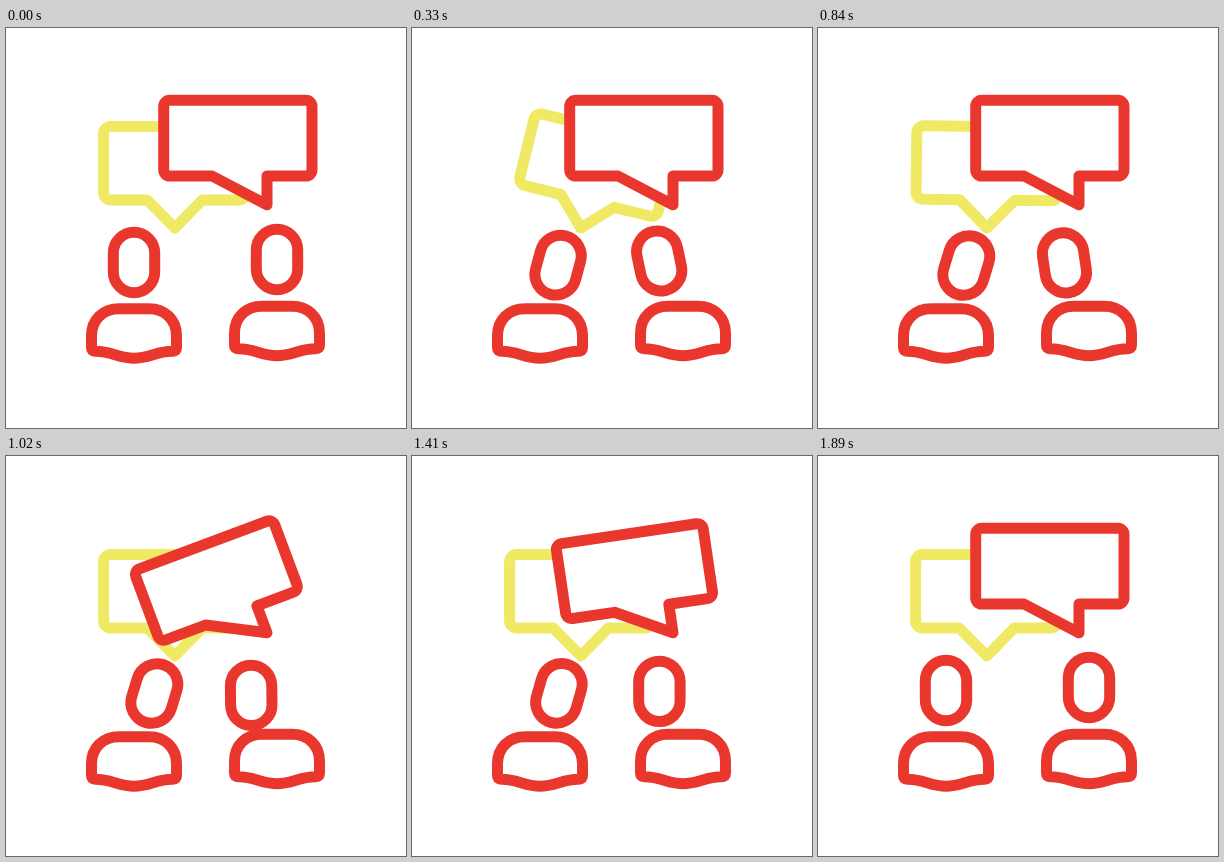
An HTML page with a canvas that plays this animation: 400x400 px, repeating every 1920 ms.

```html
<!DOCTYPE html>
<html lang="en">
<head>
<meta charset="utf-8">
<title>Conversation</title>
<style>
html, body { margin: 0; width: 100%; height: 100%; overflow: hidden; background: #fff; }
canvas { display: block; width: 100vmin; height: 100vmin; }
</style>
</head>
<body>
<canvas id="stage" width="400" height="400"></canvas>
<script>
const LOOP = 1920, STEP = 30;
const RED = '#ea372e', YELLOW = '#efe964';
const ctx = document.getElementById('stage').getContext('2d');
ctx.lineWidth = 11;
ctx.lineJoin = ctx.lineCap = 'round';

// Cosine ease from 0 to 1 between times a and b
function ease(t, a, b) {
  const u = Math.min(1, Math.max(0, (t - a) / (b - a)));
  return (1 - Math.cos(Math.PI * u)) / 2;
}

// Rises from a to b, holds, falls from c to d
const pulse = (t, a, b, c, d) => ease(t, a, b) - ease(t, c, d);

// Swing of a bubble on its tip, in degrees: each turn is smaller than the last
function swing(t) {
  const beat = 177, n = Math.floor(t / beat);
  const peak = i => i < 1 ? 0 : (-1) ** i * Math.max(0, 20.5 - 5.2 * (i - 1));
  return peak(n) + (peak(n + 1) - peak(n)) * ease(t, n * beat, (n + 1) * beat);
}

const BODY = new Path2D('M-42.5 308C-42.5 292 -31 281 -15 281H15C31 281 42.5 292 42.5 308' +
  'V320Q42.5 323.5 39 323.5C24 323 15 330.5 0 330.5C-15 330.5 -24 323 -39 323.5Q-42.5 323.5 -42.5 320Z');
const HEAD = new Path2D();
HEAD.roundRect(-20.7, -30.2, 41.4, 60.4, 20.7);

// Rounded speech bubble relative to its tip; tail joins the box at tailL and tailR
function bubble(l, t, r, b, tailL, tailR, rad) {
  const p = new Path2D();
  p.moveTo(0, 0);
  p.lineTo(tailL, b);
  p.arcTo(l, b, l, t, rad);
  p.arcTo(l, t, r, t, rad);
  p.arcTo(r, t, r, b, rad);
  p.arcTo(r, b, tailR, b, rad);
  p.lineTo(tailR, b);
  p.closePath();
  return p;
}
const BACK = bubble(-71.2, -101.5, 71.2, -28, -27.5, 27.5, 7);
const FRONT = bubble(-103.3, -104.5, 45, -28.8, -55, 0, 6);

function draw(path, color, x, y, turn = 0, fill = false) {
  ctx.save();
  ctx.translate(x, y);
  ctx.rotate(turn * Math.PI / 180);
  if (fill) {
    ctx.fillStyle = '#fff';
    ctx.fill(path);
  }
  ctx.strokeStyle = color;
  ctx.stroke(path);
  ctx.restore();
}

function render(t) {
  ctx.clearRect(0, 0, 400, 400);
  draw(BACK, YELLOW, 168.8, 200, swing(t));
  draw(FRONT, RED, 261, 176.8, swing(t - 840), true);
  draw(BODY, RED, 128, -0.3);
  draw(BODY, RED, 271, -2.7);

  const left = pulse(t, 0, 420, 1330, 1810);
  draw(HEAD, RED, 128 + 20.3 * left, 234.5 + 3 * left, 17 * left);

  const right = pulse(t, 0, 350, 1350, 1790);
  const nod = pulse(t, 700, 1100, 1230, 1530);
  const tilt = pulse(t, 0, 350, 700, 1080);
  draw(HEAD, RED, 271 - 24 * right - 2 * nod, 231.5 + 1.5 * right + 7 * nod, -12 * tilt);
}

const start = performance.now();
function tick() {
  const t = (performance.now() - start) % LOOP;
  render(Math.floor(t / STEP) * STEP);
  requestAnimationFrame(tick);
}
tick();
</script>
</body>
</html>
```
